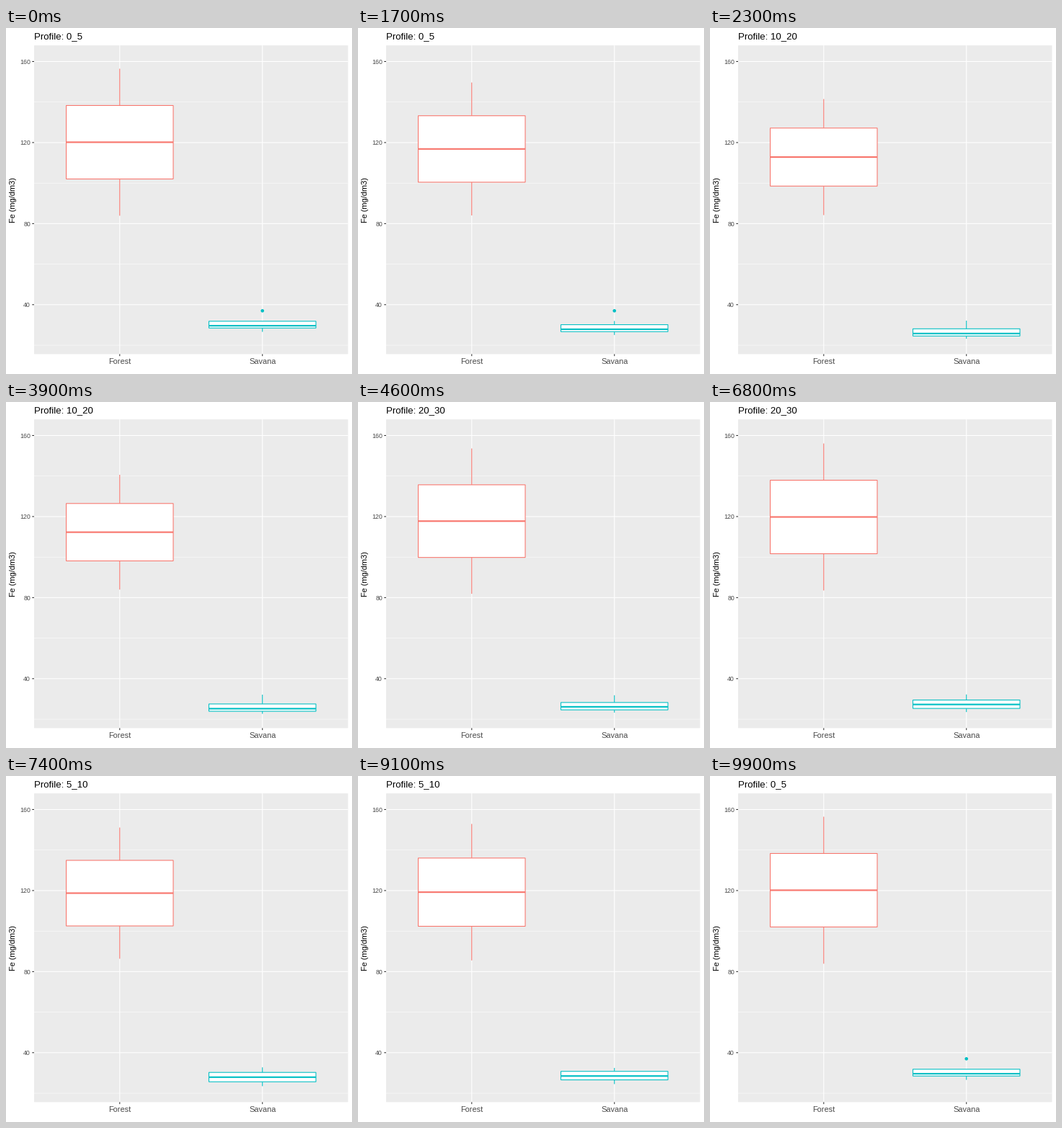
Animation, 480 px wide and 480 px high, one loop 10 s. Source, as a matplotlib script:

```python
import numpy as np
import matplotlib.pyplot as plt
from matplotlib.animation import FuncAnimation
from matplotlib.patches import Circle, Rectangle

plt.rcParams["font.family"] = "Liberation Sans"

SIZE, DPI = 480, 100
PT = 72 / DPI  # points per pixel
FRAMES, INTERVAL = 100, 100

LEFT, RIGHT, TOP, BOTTOM = 39.0, 474.5, 24.1, 452.4
STEP = (RIGHT - LEFT) / 2.2
CENTERS = [LEFT + 0.6 * STEP, LEFT + 1.6 * STEP]
HALF = 0.375 * STEP
THIN, THICK = 1.07, 2.13

PROFILES = ["0_5", "10_20", "20_30", "5_10"]
# whisker top, upper quartile, median, lower quartile, whisker bottom (px)
FOREST = np.array([np.linspace(a, b, 5) for a, b in
                   [(56.5, 260.4), (106.2, 259.4), (43.6, 269.4), (71.5, 253.5)]])
SAVANA = np.array([
    [406.8, 406.8, 413.0, 416.2, 421.5],
    [405.9, 419.2, 425.8, 429.3, 432.8],
    [407.3, 415.7, 421.4, 426.0, 429.9],
    [404.2, 411.2, 417.8, 424.2, 430.3],
])
# first and last frame of the move out of each state
MOVES = [(12, 25), (38, 50), (62, 74), (87, 99)]


def y_px(value):
    return 383.8 - (value - 40) * 2.811


fig = plt.figure(figsize=(SIZE / DPI, SIZE / DPI), dpi=DPI, facecolor="white")
ax = fig.add_axes([0, 0, 1, 1])
ax.set_xlim(0, SIZE)
ax.set_ylim(SIZE, 0)
ax.axis("off")


def line(x, y, color, width, z):
    item, = ax.plot(x, y, color=color, lw=width * PT, zorder=z,
                    solid_capstyle="butt", snap=False)
    return item


def text(x, y, s, size, color="black", **kw):
    return ax.text(x, y, s, fontsize=size * PT, color=color, va="baseline", **kw)


def draw_panel():
    ax.add_patch(Rectangle((LEFT, TOP), RIGHT - LEFT, BOTTOM - TOP,
                           fc="#EBEBEB", ec="none", zorder=0, snap=False))
    for v in (20, 60, 100, 140):
        line([LEFT, RIGHT], [y_px(v)] * 2, "white", THIN / 2, 1)
    for v in (40, 80, 120, 160):
        y = y_px(v)
        line([LEFT, RIGHT], [y, y], "white", THIN, 2)
        line([LEFT - 2.75, LEFT], [y, y], "#333333", THIN, 2)
        text(LEFT - 4.95, y + 3.15, str(v), 8.8, "#4D4D4D", ha="right")
    for x, name in zip(CENTERS, ("Forest", "Savana")):
        line([x, x], [TOP, BOTTOM], "white", THIN, 2)
        line([x, x], [BOTTOM, BOTTOM + 2.75], "#333333", THIN, 2)
        text(x, 466, name, 11, "#4D4D4D", ha="center")
    text(13.3, (TOP + BOTTOM) / 2, "Fe (mg/dm3)", 11, ha="center",
         rotation=90, rotation_mode="anchor")


class Box:
    def __init__(self, x, color, states):
        self.x, self.states = x, states
        self.upper = line([x, x], [0, 0], color, THIN, 4)
        self.lower = line([x, x], [0, 0], color, THIN, 4)
        self.body = ax.add_patch(Rectangle(
            (x - HALF, 0), 2 * HALF, 1, fc="white", ec=color, lw=THIN * PT,
            joinstyle="miter", zorder=5, snap=False))
        self.median = line([x - HALF, x + HALF], [0, 0], color, THICK, 6)

    def pose(self, a, b, t):
        hi, q3, mid, q1, lo = self.states[a] * (1 - t) + self.states[b] * t
        self.upper.set_ydata([hi, q3])
        self.lower.set_ydata([q1, lo])
        self.body.set_y(q3)
        self.body.set_height(q1 - q3)
        self.median.set_ydata([mid, mid])


def progress(frame):
    """Return the state being left, the next one and the share of the way."""
    for i, (start, end) in enumerate(MOVES):
        if frame < end:
            return i, (i + 1) % 4, max(0, frame - start) / (end - start)
    return 0, 1, 0.0


draw_panel()
title = text(LEFT, 15, "", 13.2, ha="left")
boxes = [Box(CENTERS[0], "#F8766D", FOREST), Box(CENTERS[1], "#00BFC4", SAVANA)]
outlier = ax.add_patch(Circle((CENTERS[1], 392.3), 2.3, fc="#00BFC4",
                              ec="none", zorder=3))


def update(frame):
    a, b, t = progress(frame)
    for box in boxes:
        box.pose(a, b, t)
    title.set_text("Profile: " + PROFILES[b if t > 0.5 else a])
    outlier.set_visible((a if t < 0.5 else b) == 0)
    return []


anim = FuncAnimation(fig, update, frames=FRAMES, interval=INTERVAL,
                     init_func=lambda: update(0), repeat=True, repeat_delay=0)
plt.show()
```
